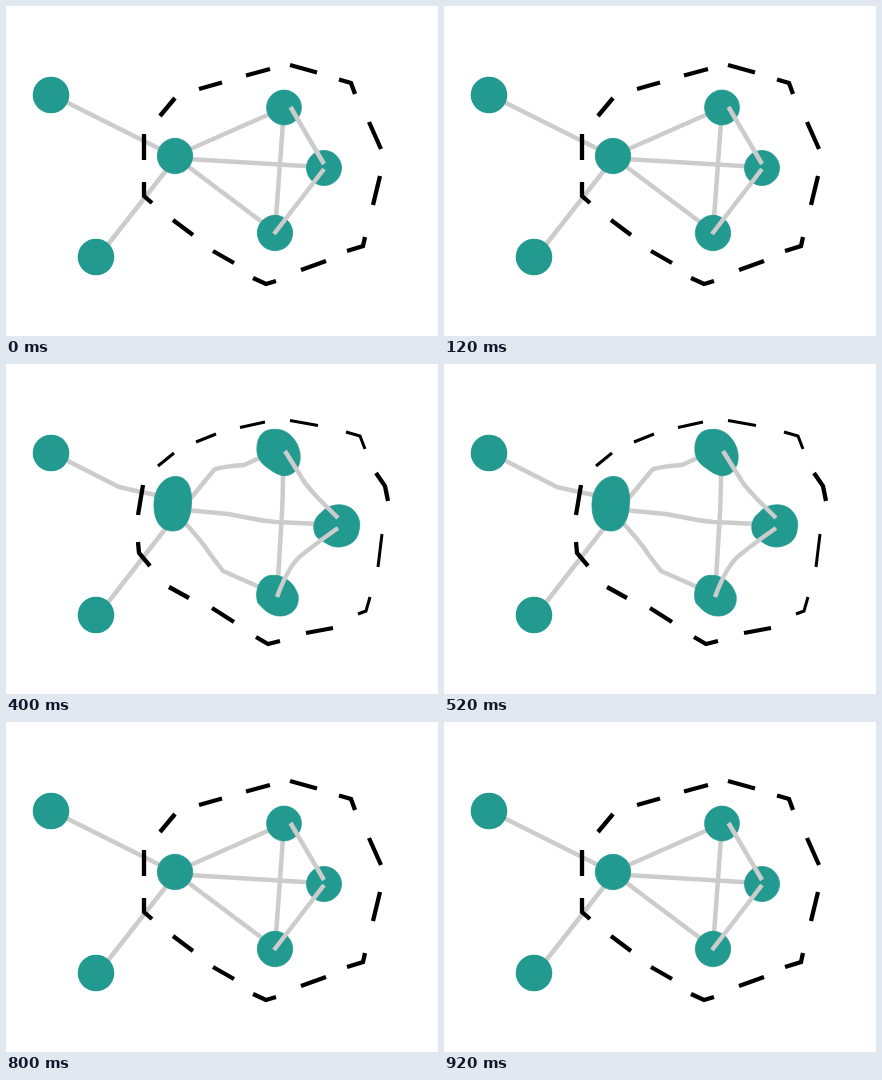
These frames come from a looping animation (432 by 330 pixels, 1000 ms). An HTML page:

```html
<!DOCTYPE html>
<html lang="en">
<head>
<meta charset="utf-8">
<title>Network group</title>
<style>
html, body { margin: 0; width: 100%; height: 100%; overflow: hidden; background: #fff; }
svg { display: block; width: 100vw; height: 100vh; }
#links, #spokes { fill: none; stroke: #ccc; stroke-width: 4.5; stroke-linejoin: round; }
#nodes, circle { fill: #229a90; }
#nodes { stroke: #229a90; stroke-width: .8; }
#outline, #fine { fill: none; stroke: #000; stroke-width: 4.3; }
#fine { stroke-width: 3; }
</style>
</head>
<body>
<svg viewBox="0 0 432 330">
  <path id="links"/>
  <circle cx="45" cy="89" r="18.3"/>
  <circle cx="90" cy="251" r="18.3"/>
  <path id="nodes"/>
  <path id="spokes"/>
  <path id="outline"/>
  <path id="fine"/>
</svg>
<script>
const STEP = 200;
const ORDER = [0, 1, 2, 1, 0];

const disc = (x, y, r) =>
  `M${x - r} ${y}a${r} ${r} 0 1 1 ${2 * r} 0a${r} ${r} 0 1 1 ${-2 * r} 0Z`;

// links lie behind the nodes, spokes in front of them; fine holds the thinner dashes
const poses = [
  {
    nodes: disc(169, 150, 17.7) + disc(278, 101.5, 17.4) + disc(318, 162, 17.5) + disc(269, 227, 17.7),
    links: `M58 95L158 145 M100 241L162 162 M180 145L266 107 M182 153L306 160.5
      M180 159L260 219 M277 116L270 212`,
    spokes: 'M284.500 101L318 158 M318 163L268 228',
    outline: `M138 128V154 M138 176V190L146 197 M167 214L187 229 M207 245L228 257
      M247 272L260 278L270 275 M295 264L320 255 M341 245L357 240L359 231
      M367 199L374 170 M375 143L363 116 M349 88L345 77L333 73.500
      M311 66.500L284 59 M264 63L240 69.500 M216 76.500L193 83 M169 92L154 110`,
    fine: ''
  },
  {
    nodes: `M171 109.500C182 110 186 124 186.500 140C187 158 179 168 167 168
      C154 168 148 156 148 142C148 126 157 110 171 109.500Z
      M281 74.500C294 73 300 79 299.500 94C299 108 291 116 279 116
      C267 116 260 107 260 95C260 83 269 76 281 74.500Z
      M309 149C317 142 332 143 343 149C350 153 354 159 353.500 165
      C352 175 342 180 331 180C318 180 310 175 307 166C306 160 306 153 309 149Z
      M264 208.500C277 207 287 214 290 227C293 241 286 250 274 250
      C261 250 252 240 252 227C252 217 256 209 264 208.500Z`,
    links: `M58 95L111 121Q122 128 132 129L160 133 M100 241L160 164
      M180 134Q196 129 210 127Q226 128 236 122L268 106 M180 132L207 126
      M182 149Q205 155 230 156L314 160
      M180 160L198 178Q207 188 220 192Q230 197 238 204L260 220
      M278 112Q278 140 275 165L272 214`,
    spokes: 'M287 95Q295 106 300 128Q306 141 316 147L332 158 M332 165Q318 177 305 184Q280 206 271 232',
    outline: `M137 121L132 151 M132 178L133 189L138 193L144 203 M161 223L185 233
      M206 244L228 258 M250 275L262 279L274 276 M300 270L327 265
      M352 248L359 245L362.500 232 M367 199Q375 186 378 170 M378 142Q366 130 366 114
      M263 61L240 69 M216 76L193 83`,
    fine: 'M359 84Q359 75 355 74L337 70 M311 64L284 58 M170 91L153 100.500'
  },
  {
    nodes: `M169 112.500C181 112 186 123 185.500 138C185 156 179 167 167 167
      C154 167 148 156 148 141C148 125 157 113 169 112.500Z
      M266 65.500C277 64 286 70 291 80C297 92 294 104 287 109
      C278 115 270 110 262 104C254 99 250 92 251 82C252 72 257 66 266 65.500Z
      M315 149C322 140 337 138 346 145C353 151 355 159 353 166
      C352 178 341 183 332 183C323 183 318 177 312 174C306 169 306 155 315 149Z
      M264 211.500C277 210 288 218 292 231C294 244 285 252 274 252
      C264 252 257 245 252 239C248 228 253 213 264 211.500Z`,
    links: `M58 95L113 123L135 128L160 133 M100 241L160 164
      M180 140L208 106Q212 103 238 101L258 92
      M180 146L222 150L243 154Q256 157 270 158L314 160
      M180 160Q198 180 204 190L217 207L260 226
      M277 106Q277 138 275 165L272 216`,
    spokes: 'M279 87L299 119Q306 128 314 136L332 154 M332 164Q312 178 297 190Q283 200 271 233',
    outline: `M137 121L132 151 M132 178L133 189L144 202 M163 223L183 234
      M206 244L228 258 M250 273L262 280L274 277 M300 269L327 264
      M370 109L379 122L382 137`,
    fine: `M352 250L360 247L364 233 M372 203L376 170
      M359 85L354 72L340 68 M312 61.500L284 56.500
      M259 58L234 63.500 M210 70L190 78 M168 89L152 102`
  }
];

const parts = ['links', 'nodes', 'spokes', 'outline', 'fine'];
const els = Object.fromEntries(parts.map(id => [id, document.getElementById(id)]));
let shown = -1;

function draw(time) {
  const index = ORDER[Math.floor(time / STEP) % ORDER.length];
  if (index === shown) return;
  shown = index;
  for (const id of parts) els[id].setAttribute('d', poses[index][id]);
}

const start = performance.now();
function tick() {
  draw(performance.now() - start);
  requestAnimationFrame(tick);
}
tick();
</script>
</body>
</html>
```
